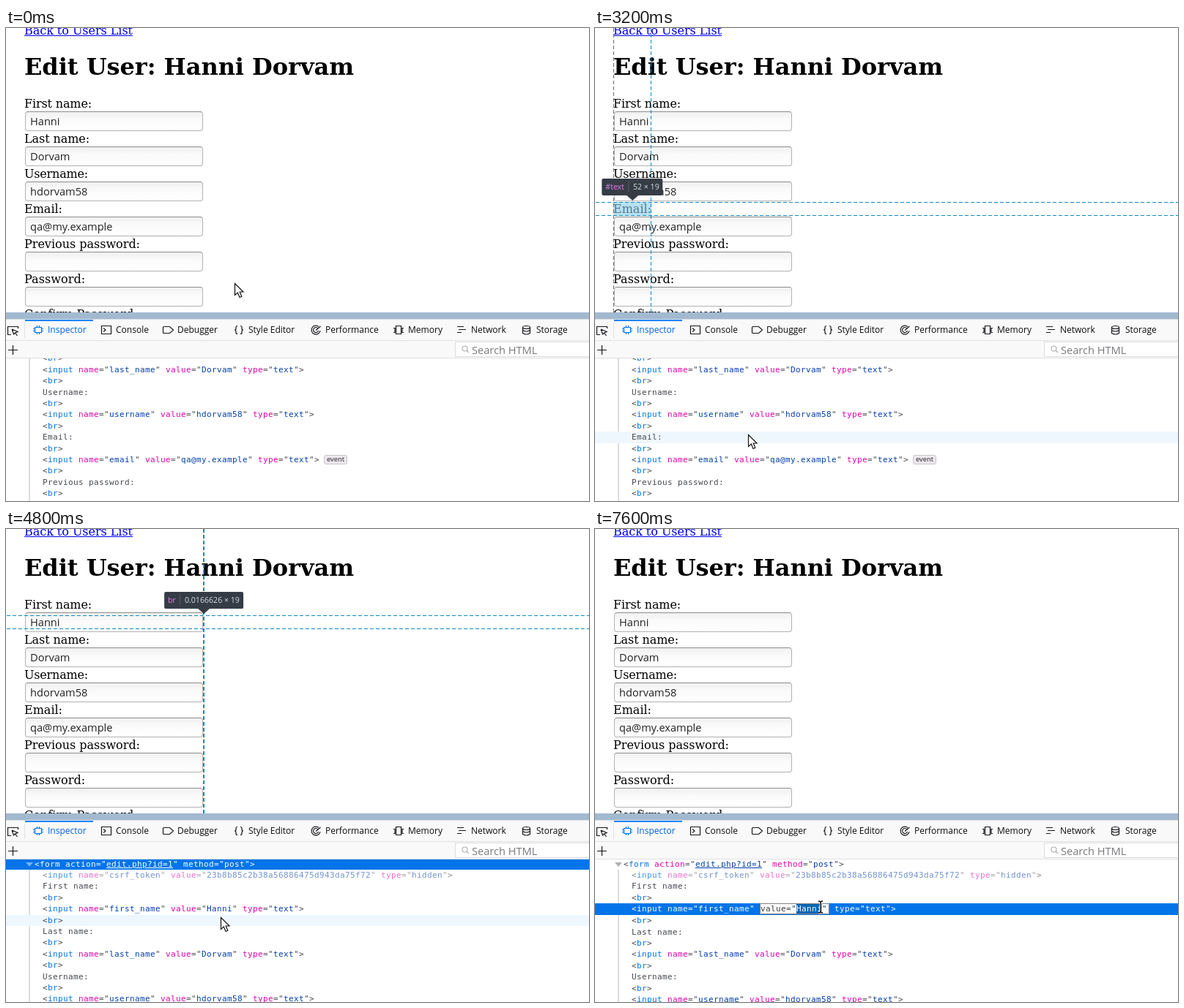
An HTML page for the animation above (8000 ms loop, 796x647 px).

```html
<!DOCTYPE html>
<html lang="en">
<head>
<meta charset="utf-8">
<title>Edit User</title>
<style>
html, body { margin: 0; width: 796px; height: 647px; overflow: hidden; background: #fff; }
body { position: relative; }
body div, body svg, h1, a { position: absolute; }
#page { inset: 0 0 auto; height: 389px; overflow: hidden; font: 16px/19px "DejaVu Serif", serif; color: #000; }
#page a { left: 25px; top: -6px; color: #00e; text-decoration: underline; white-space: nowrap; }
h1 { left: 25px; top: 34px; margin: 0; font-size: 32px; line-height: 38px; white-space: nowrap; }
.label { left: 25px; white-space: nowrap; }
.field {
  left: 26px; width: 243px; height: 27px; box-sizing: border-box; padding-left: 6px;
  border: 1px solid #b3b1af; border-top-color: #8f8d8b; border-radius: 4px;
  background: linear-gradient(#f0f0f0, #fafafa 40%, #fff);
  font: 14.6px/25px "Open Sans", sans-serif; color: #222;
}
#overlay { inset: 0; }
#overlay svg { left: 0; top: 0; }
#overlay line { stroke-dasharray: 5 3; shape-rendering: crispEdges; }
.box { opacity: .6; }
.tip {
  height: 23px; padding: 0 5px; transform: translateX(-50%); border-radius: 2px;
  background: #363c45; color: #d4dbe2; font: 10.6px/23px "Open Sans", sans-serif; white-space: nowrap;
}
.tip b { font-weight: 400; color: #e27ff0; padding-right: 5px; margin-right: 6px; border-right: 1px solid #5c636b; }
.tip::after {
  content: ""; position: absolute; top: 23px; left: 50%; margin-left: -8px;
  border: 8px solid transparent; border-top: 7px solid #363c45; border-bottom: 0;
}
#bar { left: 0; top: 389px; width: 796px; height: 63px; background: #f9f9fa; font: 12px/28px "Open Sans", sans-serif; color: #0c0c0d; }
#bar div { white-space: nowrap; }
.split { top: 0; width: 796px; height: 9px; background: #a2b9d0; }
.rule { width: 796px; height: 1px; background: #e0e0e2; }
.tab { top: 10px; }
.search {
  left: 613px; top: 40px; width: 183px; height: 21px; box-sizing: border-box; padding-left: 22px;
  border: 1px solid #dcdce0; border-right: 0; background: #fff; color: #7a7a7e; font-size: 14.6px; line-height: 20px;
}
#bar svg { left: 0; top: -389px; fill: none; stroke: #18181b; stroke-width: 1.2; }
#tree { left: 0; top: 452px; width: 796px; height: 195px; overflow: hidden; }
#rows {
  left: 0; width: 796px; color: #45484e; white-space: pre;
  font: 11px/15.4px "DejaVu Sans Mono", monospace; letter-spacing: calc(7px - 1ch);
}
#rows .row { position: relative; height: 15.4px; box-sizing: border-box; }
.stem { left: 31px; top: 77px; width: 2px; height: 400px; background: #dcdce0; }
.t { color: #0074e8; }
.n { color: #dd00a9; }
.v { color: #003eaa; }
.link { text-decoration: underline; }
.dim span { opacity: .75; }
.dim { color: #85888c; }
.hover { background: #eff7fe; }
.sel { background: #0074e8; color: #fff; }
.sel * { color: #fff; }
.open::before {
  content: ""; position: absolute; left: 27px; top: 5px;
  border: 5px solid transparent; border-top: 6px solid #b0b0b3; border-bottom: 0;
}
.sel.open::before { border-top-color: #75b2f2; }
.sel .value { outline: 1px dotted #10306a; }
#rows .edit { height: 16px; line-height: 16px; }
.edit .value { outline: 0; border: 1px dotted #000; padding-right: 2px; background: #fff; color: #38383d; }
.edit .value * { color: #38383d; }
.edit .value .v { background: #0a64b4; color: #fff; }
.badge {
  display: inline-block; vertical-align: top; height: 13px; box-sizing: border-box; margin: 1px 0 0 6px; padding: 0 3px;
  border: 1px solid #c9c5cb; border-radius: 3px; background: #ece8ee; color: #222;
  font: 9.4px/10px "Open Sans", sans-serif; letter-spacing: 0;
}
#arrow, #beam { overflow: visible; left: 0; top: 0; }
</style>
</head>
<body>
<div id="page">
  <a>Back to Users List</a>
  <h1></h1>
  <div id="form"></div>
  <div id="overlay"></div>
</div>

<div id="bar">
  <div class="split"></div>
  <div class="rule" style="top:9px"></div>
  <div class="rule" style="top:38px"></div>
  <div class="rule" style="top:62px"></div>
  <div class="rule" style="left:25px;top:14px;width:1px;height:21px"></div>
  <div class="rule" style="left:26px;top:10px;width:93px;height:2px;background:#0a84ff"></div>
  <div class="search">Search HTML</div>
  <svg width="796" height="452">
    <path d="M7 419.5H2.5V408.5H16.500V411M8 412l8 3.500-3.500 1.500 3 4M8 412l2.500 7 2-2"/>
    <path d="M3 440.500h13M9.500 434v13"/>
    <path stroke="#0074e8" d="M39.500 409.500h9v7h-9zM37 411.500h2M37 414.500h2M49 411.500h2M49 414.500h2M42.500 407v2M45.500 407v2M42.500 417v2M45.500 417v2"/>
    <path d="M130.500 407.500h13v11h-13zM133 410.500l3 2.500-3 2.500"/>
    <path d="M215.500 408.500h8l5 4.500-5 4.500h-8q-1 0-1-1v-7q0-1 1-1z"/>
    <path d="M316 407.500q-2 0-2 2v1.500q0 2-2 2 2 0 2 2v1.500q0 2 2 2M320 407.500q2 0 2 2v1.500q0 2 2 2-2 0-2 2v1.500q0 2-2 2"/>
    <path d="M427 408.500a6 6 0 1 0 2 5.500M426 411a3.500 3.500 0 1 0 .5 3M423 413.500l6.500-5.500"/>
    <path d="M532.500 407.500h7v11h-7zM529 410.500h2v6h-2M543 410.500h-2v6h2"/>
    <path d="M616 408.500h9M618 412.500h10M616 416.500h6"/>
    <path d="M705.500 409.500v8q5 3 10 0v-8M705.500 413.500q5 3 10 0"/><ellipse cx="710.5" cy="409.500" rx="5" ry="2"/>
    <g stroke="#b0b0b4"><circle cx="626.500" cy="438.500" r="3.500"/><path d="M629 441l3 3"/></g>
  </svg>
</div>

<div id="tree"><div id="rows"></div></div>

<svg id="arrow" width="16" height="22"><path d="M.5.5V16.500L4.300 13 7 19.500 9.800 18.300 7.200 12H12Z" fill="#fff" stroke="#111" stroke-width="1.2"/></svg>
<svg id="beam" width="10" height="18">
  <path d="M-3-8q3 0 3 2V6q0 2-3 2M3-8q-3 0-3 2M3 8q-3 0-3-2" fill="none" stroke="#fff" stroke-width="3"/>
  <path d="M-3-8q3 0 3 2V6q0 2-3 2M3-8q-3 0-3 2M3 8q-3 0-3-2" fill="none" stroke="#000" stroke-width="1.4"/>
</svg>

<script>
const $ = id => document.getElementById(id);
const LOOP = 8000, ROW = 15.4, ABOVE = 4;
const first = 'Hanni', last = 'Dorvam';

// label, attribute name, value
const fields = [
  ['First name:', 'first_name', first],
  ['Last name:', 'last_name', last],
  ['Username:', 'username', 'hdorvam58'],
  ['Email:', 'email', 'qa@my.example'],
  ['Previous password:', 'previous_password', ''],
  ['Password:', 'password', ''],
  ['Confirm Password', 'confirm', '']
];

document.querySelector('h1').textContent = `Edit User: ${first} ${last}`;
$('form').innerHTML = fields.map(([label, , value], k) =>
  `<div class="label" style="top:${94 + 48 * k}px">${label}</div>
   <div class="field" style="top:${114 + 48 * k}px">${value}</div>`).join('');

// space text as if every glyph advanced by whole pixels
const pen = document.createElement('canvas').getContext('2d');
function hint(el) {
  const { fontWeight, fontSize, fontFamily } = getComputedStyle(el);
  pen.font = `${fontWeight} ${fontSize} ${fontFamily}`;
  const chars = [...el.textContent];
  const excess = chars.reduce((sum, c) => {
    const w = pen.measureText(c).width;
    return sum + Math.round(w) - w;
  }, 0);
  el.style.letterSpacing = excess / chars.length + 'px';
}
document.querySelectorAll('#page a, h1, .label').forEach(hint);
const labelWidths = [...document.querySelectorAll('.label')].map(e => e.offsetWidth);

const tabs = { Inspector: 57, Console: 150, Debugger: 234, 'Style Editor': 331, Performance: 436, Memory: 549, Network: 635, Storage: 724 };
for (const [name, x] of Object.entries(tabs)) {
  const color = name === 'Inspector' ? '#0060df' : 'inherit';
  $('bar').insertAdjacentHTML('beforeend', `<div class="tab" style="left:${x}px;color:${color}">${name}</div>`);
}

// markup tree
const attr = ([n, v]) =>
  ` <span class="${n}"><span class="n">${n}</span>="<span class="v${n === 'action' ? ' link' : ''}">${v}</span>"</span>`;
const tag = (name, attrs = {}) =>
  `&lt;<span class="t">${name}</span>${Object.entries(attrs).map(attr).join('')}&gt;`;
const close = name => `&lt;/<span class="t">${name}</span>&gt;`;
const row = (html, x = 50, cls = '') => `<div class="row ${cls}" style="padding-left:${x}px">${html}</div>`;

const lines = [
  row(tag('head') + close('head'), 28),
  row(tag('body'), 28),
  row(tag('a', { href: 'list.php' }) + 'Back to Users List' + close('a'), 39),
  row(tag('h1') + `Edit User: ${first} ${last}` + close('h1'), 39),
  row(tag('form', { action: 'edit.php?id=1', method: 'post' }), 39, 'open'),
  row(tag('input', { name: 'csrf_token', value: '23b8b85c2b38a56886475d943da75f72', type: 'hidden' }), 50, 'dim')
];
for (const [label, name, value] of fields.slice(0, 5)) {
  const badge = name === 'email' ? '<span class="badge">event</span>' : '';
  lines.push(row(label), row(tag('br')), row(tag('input', { name, value, type: 'text' }) + badge), row(tag('br')));
}
$('rows').innerHTML = '<div class="stem"></div>' + lines.join('');
const rowEls = [...document.querySelectorAll('.row')].slice(ABOVE);

// pointer moves: start, number of 100 ms steps, end point
const moves = [
  [400, 8, 243, 513], [1600, 7, 225, 494], [3200, 1, 209, 556], [3300, 2, 288, 541],
  [4700, 2, 293, 531], [5200, 1, 297, 526], [5400, 3, 302, 519], [6200, 3, 305, 518],
  [6600, 3, 316, 521], [7000, 1, 316, 519], [7200, 1, 308, 519], [7500, 2, 308, 517]
];
function pointer(t) {
  let x = 312, y = 349;
  for (const [start, steps, x1, y1] of moves) {
    if (t < start) break;
    const p = Math.min(1, (Math.floor((t - start) / 100) + 1) / steps);
    const e = p * p * (3 - 2 * p);
    x += (x1 - x) * e;
    y += (y1 - y) * e;
  }
  return [Math.round(x), Math.round(y)];
}

// centre line of the form row
const scrollAt = t => t < 4100 ? 344.4 : t < 4500 ? 406.4 : t < 4700 ? 520.8 : t < 4800 ? 489.8 : 458.4;

const BLUE = '#0a88c4', GREY = '#6b6b70';
const guide = (x1, y1, x2, y2, color) =>
  `<line x1="${x1}" y1="${y1}" x2="${x2}" y2="${y2}" stroke="${color}"/>`;
const rect = (x, y, w, h, color) =>
  `<div style="left:${x}px;top:${y}px;width:${w}px;height:${h}px;background:${color}"></div>`;

function highlight(i) {
  if (i < 2) return '';
  const k = Math.floor((i - 2) / 4), part = (i - 2) % 4, dy = 48 * k;
  const end = part < 2 ? 25 + labelWidths[k] : 270;
  let name = 'br', size = part === 1 ? '0.0166702 × 19' : '0.0166626 × 19';
  let x1 = end - 1, x2 = end, top = (part === 3 ? 118 : 94) + dy, mid = end, box = '';
  let y1 = top, y2 = top + 18, left = BLUE, color = BLUE;
  if (part === 0) {
    name = '#text';
    size = `${labelWidths[k]} × 19`;
    x1 = 25; x2 = end - 1; mid = (25 + end) / 2; left = GREY;
    box = rect(25, top, labelWidths[k], 19, '#87ceeb');
  } else if (part === 2) {
    name = 'input';
    size = '245 × 29';
    top = 113 + dy; y1 = top + 6; y2 = top + 22;
    x1 = 33; x2 = 261; mid = 148; left = color = GREY;
    box = rect(25, top, 245, 29, '#444') + rect(32, top + 5, 231, 18, '#6a5acd') + rect(33, top + 6, 229, 16, '#87ceeb');
  }
  return `<div class="box">${box}</div><svg width="796" height="389">` +
    guide(x1 + .5, 0, x1 + .5, 389, left) + guide(x2 + .5, 0, x2 + .5, 389, color) +
    guide(1, y1 + .5, 796, y1 + .5, color) + guide(1, y2 + .5, 796, y2 + .5, color) +
    `</svg><div class="tip" style="left:${mid}px;top:${top - 32}px"><b>${name}</b>${size}</div>`;
}

let shown = null;
function draw(t) {
  const [x, y] = pointer(t), base = scrollAt(t), top = base - ROW / 2;
  const editing = t >= 6600;
  const hover = y < 452 || editing ? -1 : Math.floor((y - top) / ROW);
  const selected = t < 5800 ? 0 : 4;

  $('rows').style.top = top - ABOVE * ROW - 452 + 'px';
  rowEls.forEach((el, i) => {
    el.classList.toggle('hover', i === hover && i !== selected);
    el.classList.toggle('sel', i === selected);
    el.classList.toggle('edit', i === 4 && editing);
  });
  if (hover !== shown) {
    $('overlay').innerHTML = highlight(hover);
    shown = hover;
  }
  $('arrow').style.display = editing ? 'none' : '';
  $('beam').style.display = editing ? '' : 'none';
  $(editing ? 'beam' : 'arrow').style.transform = `translate(${x}px, ${y}px)`;
}

const began = performance.now();
function tick() {
  draw((performance.now() - began) % LOOP);
  requestAnimationFrame(tick);
}
tick();
</script>
</body>
</html>
```
